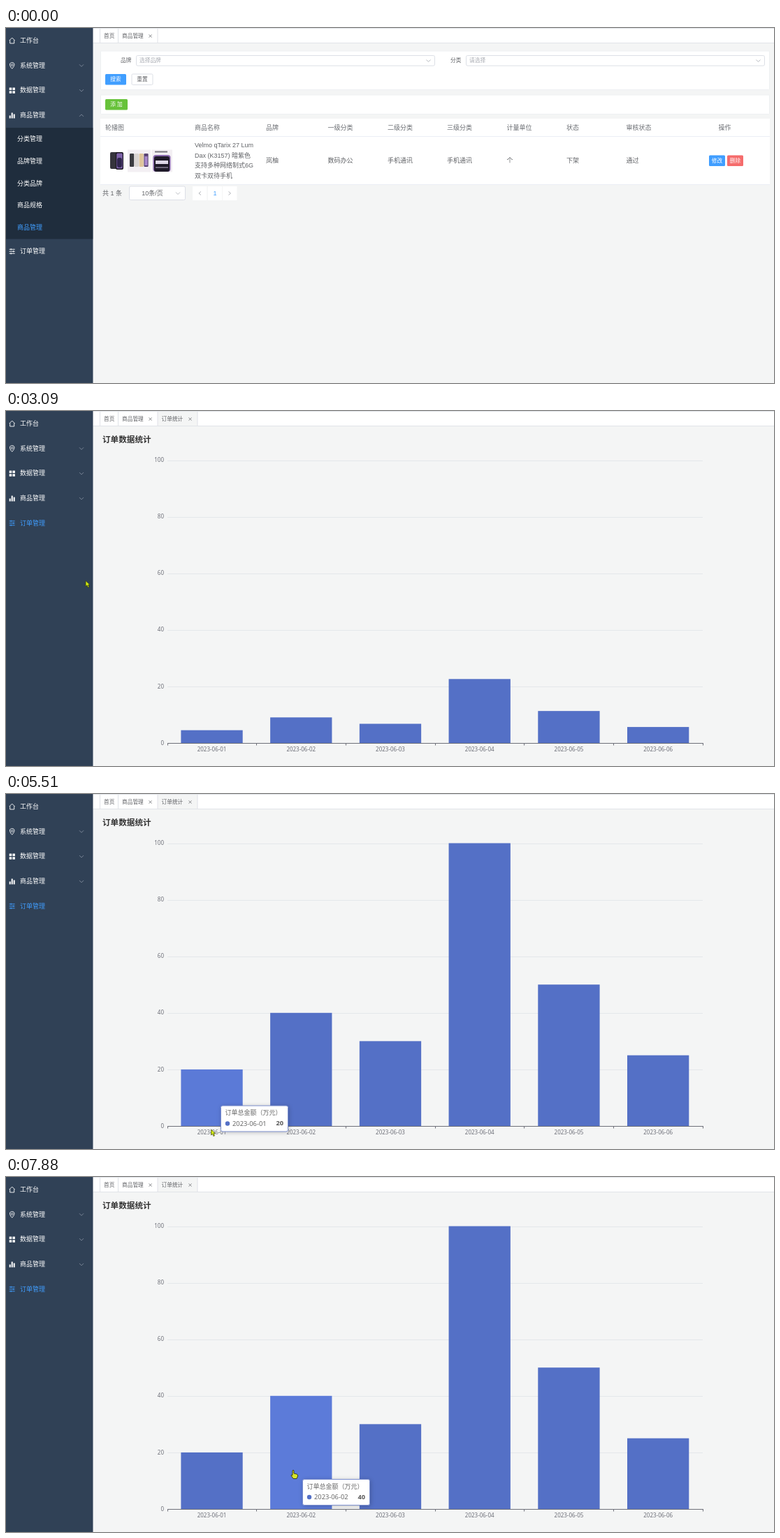
Write an HTML page with a canvas that moves like this. It is 1099 px wide and 509 px high and loops after 8 s.

```html
<!DOCTYPE html>
<html lang="zh">
<head>
<meta charset="utf-8">
<style>
html, body { margin: 0; width: 100%; height: 100%; overflow: hidden; background: #f4f5f5; }
canvas { display: block; }
</style>
</head>
<body>
<canvas id="stage" width="1099" height="509"></canvas>
<script>
const c = document.getElementById('stage').getContext('2d');
const UI = '"Liberation Sans", "Noto Sans CJK SC", "Noto Sans CJK", sans-serif';
const CHART = '"Noto Sans", "Noto Sans CJK SC", "Noto Sans CJK", sans-serif';
const LOOP = 8000, SWITCH = 2670, BLUE = '#409eff';
const values = [20, 40, 30, 100, 50, 25];
const BASE = 476, UNIT = 4.055, BAR_W = 88.3;
const barX = i => 250.4 + 127.72 * i;
const clamp = v => Math.max(0, Math.min(1, v));
const inOut = p => p < .5 ? 4 * p ** 3 : 1 - 4 * (1 - p) ** 3;

// Pointer path: time, x, y
const path = [
  [130, 1043, 188], [500, 750, 424], [880, 441, 300], [950, 438, 304], [1350, 200, 296],
  [1710, 18, 235], [1780, 16, 254], [2060, 47, 322], [SWITCH, 47, 322], [3090, 114, 243.5],
  [3440, 120, 240], [3640, 124, 238], [4130, 196, 199], [4200, 203, 202], [4540, 374, 265],
  [4810, 374, 265], [5250, 306, 385], [5410, 294, 433], [5510, 293.5, 481], [5650, 295, 484],
  [6050, 298, 428], [6420, 300, 455], [6490, 301, 456], [6860, 309, 461], [7000, 309, 461],
  [7260, 325, 462], [7330, 336, 460], [7780, 411, 420], [LOOP, 411, 420]
];

function pointer(t) {
  const n = path.findIndex(p => p[0] > t);
  if (n < 1) return path[n < 0 ? path.length - 1 : 0].slice(1);
  const [t0, x0, y0] = path[n - 1], [t1, x1, y1] = path[n];
  const k = (t - t0) / (t1 - t0);
  return [x0 + (x1 - x0) * k, y0 + (y1 - y0) * k];
}

function barAt(t) {
  if (t < 4000) return -1;
  const [x, y] = pointer(t);
  return values.findIndex((v, i) =>
    x >= barX(i) && x <= barX(i) + BAR_W && y >= BASE - v * UNIT && y <= BASE);
}

function text(s, x, y, size = 9, color = '#606266', align = 'left', weight = 400, family = UI) {
  c.font = `${weight} ${size}px ${family}`;
  c.textAlign = align;
  c.textBaseline = 'middle';
  c.fillStyle = color;
  c.fillText(s, x, y + .4);
}

function rect(x, y, w, h, color) {
  c.fillStyle = color;
  c.fillRect(x, y, w, h);
}

function box(x, y, w, h, r, fill, stroke) {
  c.beginPath();
  c.roundRect(x, y, w, h, r);
  c.fillStyle = fill;
  c.fill();
  if (stroke) { c.strokeStyle = stroke; c.lineWidth = 1; c.stroke(); }
}

function disc(x, y, r, color) {
  c.fillStyle = color;
  c.beginPath();
  c.arc(x, y, r, 0, 7);
  c.fill();
}

function shape(d, x, y, stroke, fill, width = 1) {
  const p = new Path2D(d);
  c.save();
  c.translate(x, y);
  if (fill) { c.fillStyle = fill; c.fill(p); }
  if (stroke) { c.strokeStyle = stroke; c.lineWidth = width; c.stroke(p); }
  c.restore();
}

const chevron = (x, y, dir = 1, color = '#a8abb2') =>
  shape(`M-3 ${-1.5 * dir}L0 ${1.5 * dir}L3 ${-1.5 * dir}`, x, y, color, null, .8);

function button(s, x, y, w, fill, color = '#fff', stroke) {
  box(x, y, w, 15.4, 1.5, fill, stroke);
  text(s, x + w / 2, y + 7.7, 7.7, color, 'center');
}

function sidebar(t) {
  const fold = inOut(clamp((t - SWITCH) / 300));
  const subH = 159.5 * (1 - fold), last = 160.8 + subH;
  const active = t >= SWITCH;
  const [px, py] = pointer(t);
  rect(0, 0, 124.5, 509, '#304156');
  if (t > 130 && px < 124 && Math.abs(py - last) < 18) rect(0, last - 18, 124.5, 36, '#263445');

  const rows = ['工作台', '系统管理', '数据管理', '商品管理'];
  rows.forEach((s, i) => {
    const y = 18 + 35.8 * i;
    text(s, 20, y, 9, '#fff', 'left', 500);
    if (i) chevron(108, y, i === 3 ? 2 * fold - 1 : 1, '#8995a5');
  });
  shape('M-4 0L0-4L4 0M-3-.5V4H3V-.5', 8.7, 18, '#fff', null, .9);
  shape('M0 4.5C-5-.5-3.5-4.3 0-4.3S5-.5 0 4.5ZM1.4-.8A1.4 1.4 0 1 1 1.39-.9', 8.7, 53.8, '#fff', null, .9);
  shape('M-4-4h3.5v3.5H-4ZM.7-4h3.5v3.5H.7ZM-4 .7h3.5v3.5H-4ZM.7 .7h3.5v3.5H.7Z', 8.7, 89.5, null, '#fff');
  shape('M-4 0h2v4h-2ZM-1-4h2v8h-2ZM2-2h2v6h-2Z', 8.7, 125.4, null, '#fff');

  c.save();
  c.beginPath();
  c.rect(0, 143, 124.5, subH);
  c.clip();
  rect(0, 143, 124.5, 160, '#1f2d3d');
  ['分类管理', '品牌管理', '分类品牌', '商品规格', '商品管理'].forEach((s, i) =>
    text(s, 16, 159 + 31.85 * i, 9, i === 4 && !active ? BLUE : '#fff', 'left', 500));
  c.restore();

  const color = active ? BLUE : '#fff';
  text('订单管理', 20, last, 9, color, 'left', 500);
  shape('M-4-3H4M-4 0H4M-4 3H4M-1.5-4.2v2.4M2-1.2v2.4M-1.5 1.8v2.4', 8.7, last, color, null, .9);
}

function tabs(chartOn) {
  rect(124.5, 0, 975, 22, '#fff');
  rect(124.5, 0, 975, 1, '#e1e4e8');
  rect(124.5, 21, 975, 1, '#e1e4e8');
  if (chartOn) rect(217, 1, 57, 20, '#f4f5f5');
  const edges = chartOn ? [134, 160, 216.5, 273.5] : [134, 160, 216.5];
  edges.forEach(x => rect(x, 1, 1, 20, '#dfe2e7'));
  text('首页', 140, 11, 7.7);
  const close = x => shape('M-2-2L2 2M2-2L-2 2', x, 11.5, '#606266', null, .8);
  text('商品管理', 166, 11, 7.7);
  close(206.5);
  if (chartOn) {
    text('订单统计', 222.5, 11, 7.7);
    close(263.5);
  }
}

function photos() {
  box(149, 178, 11, 24, 2, '#35343c');
  box(157, 178, 11, 25, 2, '#18151f');
  box(158.2, 179.5, 8.6, 22, 1.5, '#7d62a8');
  box(159, 186, 7, 14, 3, '#30264d');
  rect(174, 174.5, 33, 32, '#f3eff3');
  ['#3b3b40', '#d9d4d2', '#dfc59b', '#5a4372'].forEach((color, i) =>
    box(177 + 6.8 * i, 180, 6.2, 19, 1.2, color));
  rect(198.5, 184, 4, 13, '#a987cd');
  rect(208.5, 174.5, 29.5, 32, '#f3eff3');
  rect(213, 176.5, 18, 2, '#77747c');
  box(210.5, 182, 25, 24, 4, '#8867ad');
  box(212, 184, 22, 22, 3, '#1f1a29');
  rect(214, 190, 18, 5, '#ded7e7');
  rect(214, 199, 18, 2, '#6d6579');
}

function products() {
  const card = (y, h) => box(135.5, y, 957, h, 1, '#fff', '#eef0f2');
  card(33, 55.5);
  card(96, 27.5);
  text('品牌', 164, 46.5, 7.7);
  text('分类', 636, 46.5, 7.7);
  [[186.5, '选择品牌'], [658.5, '请选择']].forEach(([x, hint]) => {
    box(x, 39.5, 427, 14.6, 2, '#fff', '#dcdfe6');
    text(hint, x + 4.5, 46.8, 7.7, '#a8abb2');
    chevron(x + 418, 47);
  });
  button('搜索', 142, 66, 30, BLUE);
  button('重置', 180, 66, 30, '#fff', '#606266', '#dcdfe6');
  button('添 加', 142, 102, 32, '#67c23a');

  rect(135, 130, 958, 95, '#fff');
  rect(135, 155, 958, 1, '#ebeef5');
  rect(135, 224, 958, 1, '#ebeef5');
  const cols = [[142, '轮播图', ''], [270, '商品名称', ''], [372, '品牌', '岚柚'],
    [460.5, '一级分类', '数码办公'], [546, '二级分类', '手机通讯'], [631, '三级分类', '手机通讯'],
    [716.5, '计量单位', '个'], [802, '状态', '下架'], [887.5, '审核状态', '通过']];
  cols.forEach(([x, head, cell]) => {
    text(head, x, 143, 9, '#6b6e73');
    text(cell, x, 190);
  });
  text('操作', 1028.5, 143, 9, '#6b6e73', 'center');
  ['Velmo qTarix 27 Lum', 'Dax (K3157) 暗紫色', '支持多种网络制式6G', '双卡双待手机'].forEach((s, i) =>
    text(s, 270, 168.5 + 14.5 * i));
  photos();
  button('修改', 1006, 182.5, 23, BLUE);
  button('删除', 1032, 182.5, 23, '#f56c6c');

  text('共 1 条', 138, 237);
  box(176.5, 227, 80, 19.5, 2, '#fff', '#dcdfe6');
  text('10条/页', 209.5, 237, 9, '#606266', 'center');
  chevron(246, 237);
  [267, 288.7, 310].forEach(x => rect(x, 227, 20.4, 20, '#fff'));
  shape('M1.5-2.5L-1.5 0L1.5 2.5', 277.5, 237, '#a8abb2', null, .9);
  shape('M-1.5-2.5L1.5 0L-1.5 2.5', 320, 237, '#a8abb2', null, .9);
  text('1', 299, 237, 9, BLUE, 'center');
}

function tooltip(t) {
  let i = -1, k = 0;
  for (; k <= 200 && i < 0; k += 20) i = barAt(t - k);
  if (i < 0) return;
  const [px, py] = pointer(t - Math.max(100, k - 20));
  const x = px + 13, y = py + 13;
  c.save();
  c.shadowColor = 'rgba(0,0,0,.25)';
  c.shadowBlur = 6;
  c.shadowOffsetX = c.shadowOffsetY = 1;
  box(x + .5, y + .5, 96, 37, 2.5, '#fff');
  c.restore();
  box(x + .5, y + .5, 96, 37, 2.5, '#fff', '#7d90cf');
  text('订单总金额（万元）', x + 6.5, y + 11, 9, '#666', 'left', 400, CHART);
  disc(x + 10, y + 26, 3.2, '#5470c6');
  text(`2023-06-0${i + 1}`, x + 17, y + 26, 9.3, '#666', 'left', 400, CHART);
  text(values[i], x + 90, y + 26, 9.2, '#555', 'right', 700, CHART);
}

function chart(t) {
  text('订单数据统计', 138, 41, 11.6, '#333', 'left', 700);
  for (let v = 0; v <= 100; v += 20) {
    const y = BASE - v * UNIT;
    if (v) rect(231, Math.round(y), 766, 1, '#e4e7ea');
    text(v, 226, y, 8, '#6e7079', 'right', 400, CHART);
  }
  const step = 3090 + 70 * Math.floor((t - 3090) / 70);
  const grow = inOut(clamp((step - 2687) / 1050));
  values.forEach((v, i) => {
    let glow = 0;
    for (let k = 0; k < 200; k += 20) glow += (barAt(t - k) === i) / 10;
    const tone = [[84, 8], [112, 11], [198, 19]].map(([a, d]) => a + d * glow);
    const h = v * UNIT * grow;
    rect(barX(i), BASE - h, BAR_W, h, `rgb(${tone})`);
    text(`2023-06-0${i + 1}`, barX(i) + BAR_W / 2, 485, 8, '#6e7079', 'center', 400, CHART);
  });
  rect(231, 476, 766, 1, '#6e7079');
  for (let i = 0; i <= 6; i++) rect(Math.round(230.5 + 127.7 * i), 476, 1, 3.5, '#6e7079');
  tooltip(t);
}

function cursor(t) {
  if (t < 130) return;
  const [x, y] = pointer(t);
  const menuEnd = t < SWITCH ? 338 : 178;
  const onButton = t < SWITCH && x > 1006 && x < 1055 && y > 182 && y < 198;
  const hand = x < 124 && y < menuEnd || onButton || barAt(t) >= 0;
  if (t >= 2540 && t < SWITCH) disc(x - 1, y, 6.5, 'rgba(205,185,0,.65)');
  if (hand) {
    shape('M-1 1Q0-.8 1 1V5L5 6Q7 6.5 6.5 9L5 12.5H0L-3 8Q-3 6.5-1 7.5Z', x, y, '#34380a', '#d6e52a', .9);
  } else {
    shape('M0 0V8L2 6.3L3.4 9.6L5 8.9L3.6 5.8H6Z', x, y, '#34380a', '#d4ee12', .7);
  }
}

function frame() {
  const t = performance.now() % LOOP, chartOn = t >= SWITCH;
  rect(0, 0, 1099, 509, '#f4f5f5');
  tabs(chartOn);
  chartOn ? chart(t) : products();
  sidebar(t);
  cursor(t);
  requestAnimationFrame(frame);
}
frame();
</script>
</body>
</html>
```
